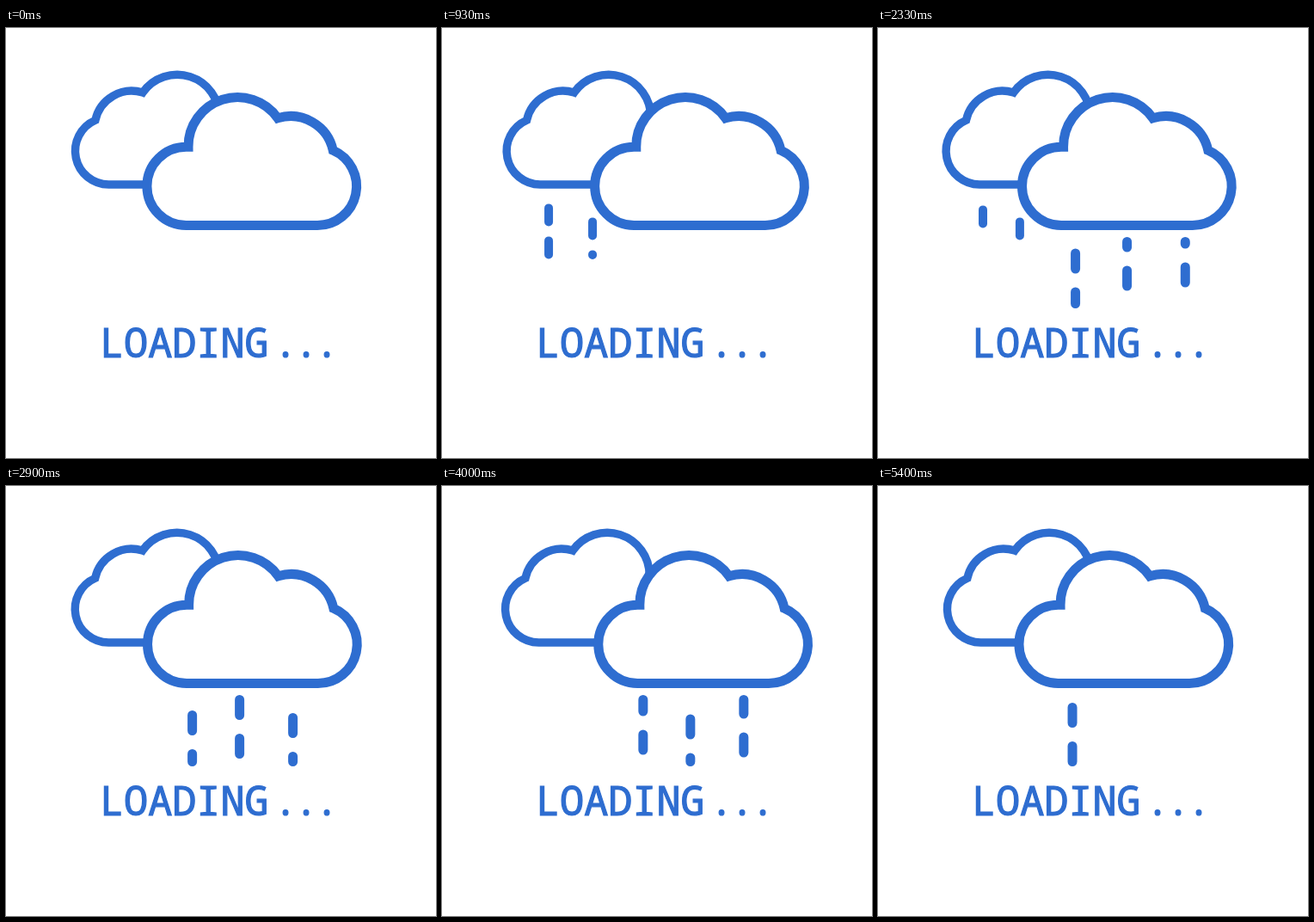
Recreate the animation shown at these times as an HTML page. Size 500 by 500 pixels, loop 5.43 s.

```html
<!DOCTYPE html>
<html lang="en">
<head>
<meta charset="utf-8">
<title>Loading</title>
<style>
  html, body { margin: 0; width: 100%; height: 100%; overflow: hidden; background: #fff; }
  svg { display: block; width: 100vw; height: 100vh; }
  .cloud { fill: #fff; stroke: #2e6dd0; stroke-width: 11; stroke-linejoin: miter; }
  .rain { stroke: #2e6dd0; stroke-linecap: round; }
  text {
    font: 400 46.8px "Noto Sans Mono", "DejaVu Sans Mono", monospace;
    fill: #2e6dd0; stroke: #2e6dd0; stroke-width: 1.2;
  }
  .dots { letter-spacing: -4.1px; }
</style>
</head>
<body>
<svg viewBox="0 0 500 500">
  <defs>
    <path id="cloud" d="M212 138.3 A57.2 57.2 0 0 1 316 104.8 A50.5 50.5 0 0 1 380.3 142.3
      A45.5 45.5 0 0 1 362 229.5 H209.5 A45.5 45.5 0 0 1 209.5 138.3 Z"/>
  </defs>
  <g id="back">
    <g id="backRain" class="rain" stroke-width="10"></g>
    <use href="#cloud" class="cloud" transform="translate(429.8 -14.7) scale(-.857 .857)"/>
  </g>
  <g id="front">
    <g id="frontRain" class="rain" stroke-width="11"></g>
    <use href="#cloud" class="cloud"/>
  </g>
  <text x="109" y="383">LOADING<tspan class="dots" x="311">...</tspan></text>
</svg>
<script>
const LOOP = 5430, CYCLE = 2720, FRAME = 40;
const FALL = 400;     // time for a dash to reach the place of the next one
const STAGGER = 60;   // delay between neighbouring columns, right to left
const REVEAL = 40;
const byId = id => document.getElementById(id);
const clamp = v => Math.max(0, Math.min(1, v));
const columns = [];

// A burst of rain: one dashed line per x; phase places its first dash.
function burst(parent, { top, bottom, dash, gap }, start, length, xs, phases) {
  xs.forEach((x, i) => {
    const el = document.createElementNS('http://www.w3.org/2000/svg', 'line');
    el.setAttribute('x1', x);
    el.setAttribute('x2', x);
    el.setAttribute('stroke-dasharray', dash + ' ' + gap);
    byId(parent).append(el);
    const on = start + STAGGER * (xs.length - 1 - i);
    columns.push({
      el, top, bottom, start, on, off: on + length, phase: phases[i], period: dash + gap
    });
  });
}

const small = { top: 204, bottom: 264, dash: 16, gap: 22 };
const large = { top: 248.5, bottom: 320.5, dash: 18, gap: 27 };
burst('backRain', small, 400, 800, [129.4, 180.4], [32, 10]);
burst('backRain', { ...small, bottom: 249 }, 1600, 800, [123.4, 166.3], [15, 29]);
burst('frontRain', large, 0, 800, [216, 271, 333], [0, 27, 3]);
burst('frontRain', large, 920, 760, [216, 271, 333], [0, 27, 3]);
burst('frontRain', large, 1800, 800, [226, 286, 353.7], [0, 20, 16]);

function drawColumn(c, t) {
  const live = t > c.on && t < c.off;
  c.el.style.display = live ? '' : 'none';
  if (!live) return;
  const span = c.bottom - c.top;
  const lead = span * clamp((t - c.on) / REVEAL);
  const tail = span * clamp((t - c.off) / REVEAL + 1);
  const fallen = c.phase + c.period * (t - c.start) / FALL;
  c.el.setAttribute('y1', c.top + tail);
  c.el.setAttribute('y2', c.top + lead);
  c.el.setAttribute('stroke-dashoffset', tail - fallen % c.period + c.period);
}

// 25 drawings a second, shown on a clock of 30 ticks a second.
function poseTime(ms) {
  const ticks = Math.floor((ms + 4) * .03);
  return Math.floor(ticks * 5 / 6) * FRAME % CYCLE;
}

function draw(ms) {
  const t = poseTime(ms % LOOP);
  const sway = (1 - Math.cos(2 * Math.PI * t / CYCLE)) / 2;
  byId('front').setAttribute('transform', `translate(${18 * sway} 0)`);
  byId('back').setAttribute('transform', `translate(${-7 * sway} 0)`);
  columns.forEach(c => drawColumn(c, t));
}

const begin = performance.now();
function tick() {
  draw(performance.now() - begin);
  requestAnimationFrame(tick);
}
tick();
</script>
</body>
</html>
```
